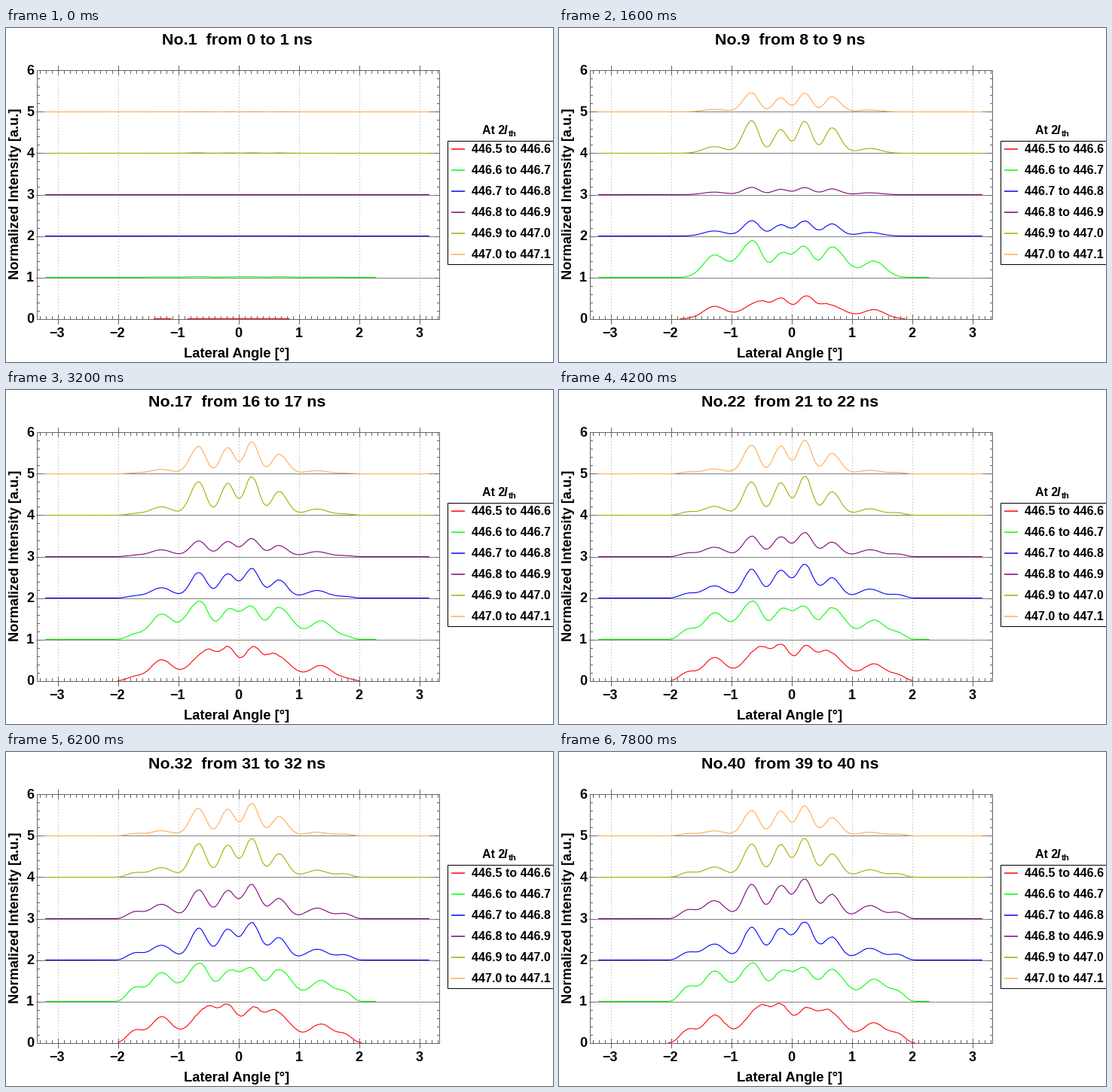
Write a matplotlib script that moves like this. It is 726 by 444 pixels and loops after 8000 ms.

```python
import numpy as np
import matplotlib.pyplot as plt
from matplotlib.animation import FuncAnimation

W, H, DPI = 726, 444, 100
FRAMES, STEP = 40, 200
LEFT, RIGHT, TOP, BOTTOM = 40, 574, 56, 386
GRAY = "#666666"

plt.rcParams["font.family"] = "Liberation Sans"
fig = plt.figure(figsize=(W / DPI, H / DPI), dpi=DPI, facecolor="white")
ax = fig.add_axes([0, 0, 1, 1])
ax.set_xlim(0, W)
ax.set_ylim(H, 0)
ax.axis("off")


def pt(px):
    return px * 72 / DPI


def sx(deg):
    return 308.6 + 80 * deg


def sy(val):
    return BOTTOM + 0.5 - 55 * val


def text(x, y, s, size, **kw):
    opts = dict(ha="center", va="baseline", weight="bold", color="black")
    opts.update(kw)
    return ax.text(x, y, s, fontsize=pt(size), **opts)


def line(xs, ys, color, width=1, **kw):
    return ax.plot(xs, ys, color=color, lw=pt(width), **kw)[0]


def frame(x0, y0, x1, y1, color):
    ax.add_patch(plt.Rectangle((x0 + 0.5, y0 + 0.5), x1 - x0, y1 - y0,
                               fill=False, ec=color, lw=pt(1), zorder=5))


def smooth(u):
    u = np.clip(u, 0, 1)
    return u * u * (3 - 2 * u)


class Band:
    """Four central fringes, a side lobe and a shoulder at each end."""
    x = np.arange(-3.2, 3.201, 0.04)

    def __init__(self, row, color, level, rise, lobe, width, fade=0,
                 young=(1, .73, .98, .78), mature=(.85, .83, 1, .6), settle=3,
                 inner=(-.66, -.18, .22, .67), right=1.3, skirt=.14, end=3.2):
        self.row, self.color = row, color
        self.level, self.rise, self.fade = level, rise, fade
        self.lobe, self.width, self.skirt = lobe, width, skirt
        self.young, self.mature = np.array(young), np.array(mature)
        self.settle, self.end = settle, end
        self.pos = np.array([-1.72, -1.28, *inner, right, 1.76])
        rng = np.random.default_rng(row + 5)
        self.grain = rng.normal(0, 0.008, (FRAMES, self.x.size))
        self.curve = line([], [], color, 1.1, zorder=4)
        self.label = f"{446.5 + row / 10:.1f} to {446.6 + row / 10:.1f}"

    def basis(self, x, n):
        core = self.width * (0.92 + 0.1 * n / FRAMES)
        lo = np.array([.13, .18, self.skirt, core, core, core, .18, .13])
        hi = np.array([.13, .18, core, core, core, self.skirt, .18, .13])
        d = np.asarray(x)[:, None] - self.pos
        return np.exp(-0.5 * (d / np.where(d < 0, lo, hi)) ** 2)

    def strength(self, n):
        since_on = np.log1p(np.exp(n - 3.5))
        return (self.level * (1 - np.exp(-since_on / self.rise))
                * np.exp(-self.fade * n))

    def peaks(self, n):
        age = np.exp(-max(n - 8, 0) / self.settle)
        core = self.mature + (self.young - self.mature) * age
        lobe = self.lobe * (0.75 + 0.3 * n / FRAMES)
        shoulder = 0.5 * smooth((n - 6) / 21)
        sides = lobe * np.array([1, 0.73])
        return np.array([shoulder * sides[0], sides[0], *core,
                         sides[1], shoulder * sides[1]])

    def values(self, n):
        amp = np.linalg.solve(self.basis(self.pos, n), self.peaks(n))
        y = self.strength(n) * (self.basis(self.x, n) @ np.clip(amp, 0, None))
        y /= 1 + np.exp((np.abs(self.x) - 1.97) / 0.04)
        return y * (1 + self.grain[n])

    def draw(self, n):
        y = self.values(n)
        keep = self.x <= self.end
        if self.row == 0:
            keep &= y > 0.002
        self.curve.set_data(sx(self.x), np.where(keep, sy(y + self.row), np.nan))


def draw_axes():
    for k in range(-3, 4):
        line([sx(k)] * 2, [TOP, BOTTOM], "#a0a0a0", 1, ls=(0, (1, 3)), zorder=1)
        text(sx(k) - (k < 0) * 0.7, 411, str(k).replace("-", "\u2212"), 18)
    for k in range(7):
        text(37.3, sy(k) + 5.5, str(k), 18, ha="right")
        if 0 < k < 6:
            line([LEFT, RIGHT], [sy(k)] * 2, "#808080", 1, zorder=2)
    for i in range(-33, 34):
        out, into = (6, 6) if i % 10 == 0 else (0, 4)
        for edge, way in ((BOTTOM + 0.5, -1), (TOP + 0.5, 1)):
            line([sx(i / 10)] * 2, [edge - way * out, edge + way * into], GRAY)
    for i in range(31):
        size = 6 if i % 5 == 0 else 3
        for edge, way in ((LEFT + 0.5, 1), (RIGHT + 0.5, -1)):
            line([edge, edge + way * size], [sy(i / 5)] * 2, GRAY)
    frame(LEFT, TOP, RIGHT, BOTTOM, GRAY)
    text(306.5, 438, "Lateral Angle [\u00b0]", 18.4)
    text(12.5, 220.5, "Normalized Intensity [a.u.]", 18.3, rotation=90,
         va="center")


def draw_legend():
    text(631.5, 141, "At 2", 16, ha="left")
    text(660.5, 141, "I", 16, ha="left", style="italic")
    text(666.5, 144, "th", 11.5, ha="left")
    frame(585, 149, 725, 313, "black")
    for i, band in enumerate(bands):
        y = 161 + 28 * i
        line([591, 609], [y, y], band.color, 1.5, solid_capstyle="butt")
        text(617.5, y + 5, band.label, 16, ha="left")


bands = [
    Band(0, "#ff0000", 0.97, 5.2, lobe=.66, width=.148,
         young=(.77, .89, 1, .64), mature=(.95, .98, .88, .85), settle=12,
         inner=(-.52, -.17, .24, .6), right=1.37, skirt=.26, end=2.3),
    Band(1, "#00ff00", 0.93, 1.5, lobe=.76, width=.155,
         young=(1, .68, .85, .83), mature=(1, .81, .87, .83),
         inner=(-.64, -.16, .21, .67), right=1.37, skirt=.22, end=2.3),
    Band(2, "#0000ff", 0.95, 9, lobe=.4, width=.138),
    Band(3, "#800080", 1.65, 40, lobe=.43, width=.134),
    Band(4, "#aaaa00", 0.95, 2.5, lobe=.25, width=.122),
    Band(5, "#ffaa55", 1.2, 8, lobe=.16, width=.118, fade=1 / 80),
]

draw_axes()
draw_legend()
title = text(306.5, 22, "", 21.4)


def update(n):
    title.set_text(f"No.{n + 1}  from {n} to {n + 1} ns")
    for band in bands:
        band.draw(n)
    return [title] + [band.curve for band in bands]


anim = FuncAnimation(fig, update, frames=FRAMES, interval=STEP,
                     init_func=lambda: update(0), repeat=True, repeat_delay=0)
plt.show()
```
